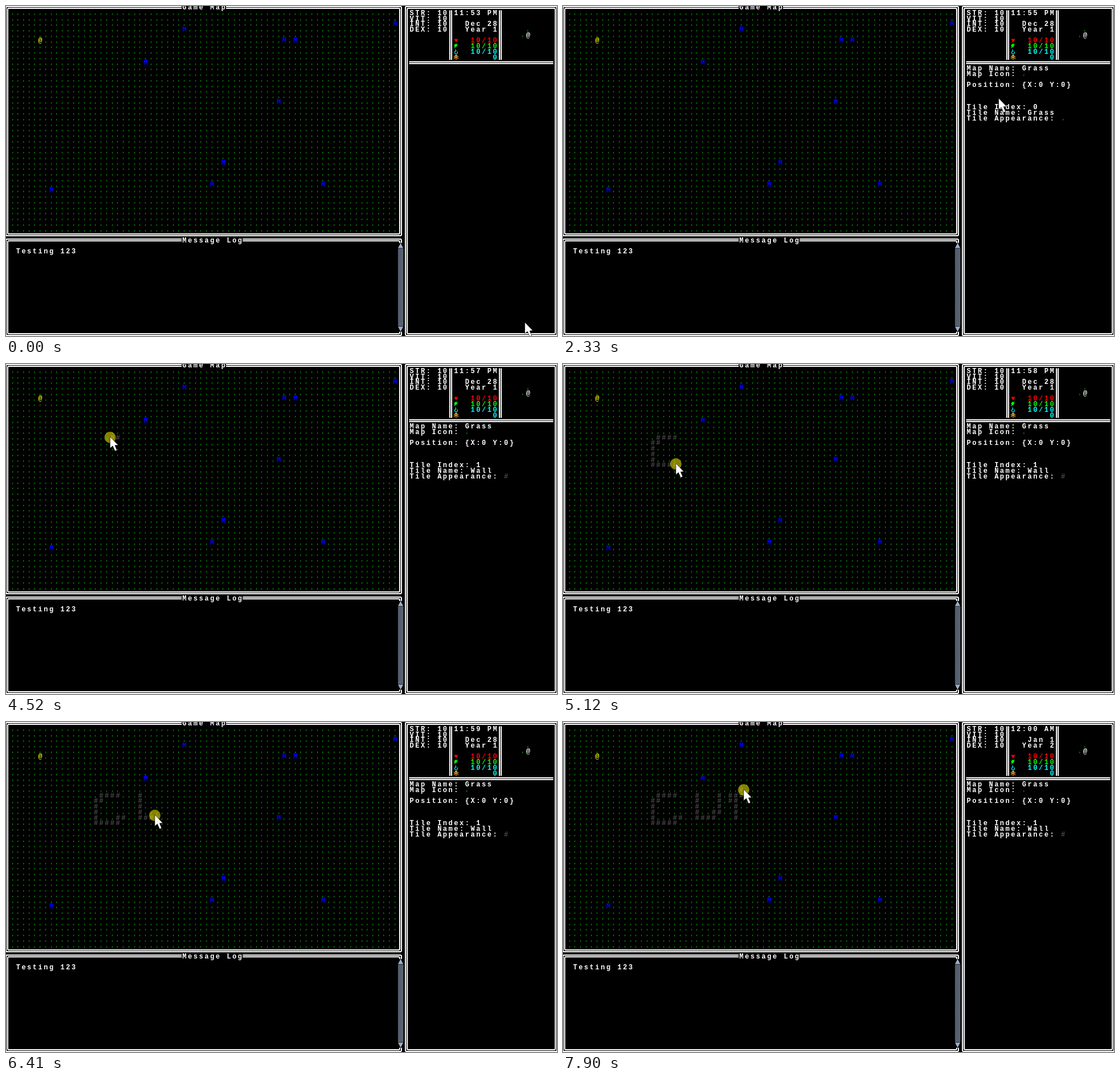
Recreate the animation shown at these times as an HTML page with a canvas. Size 967 px wide and 579 px high, loop 8000 ms.

```html
<!DOCTYPE html>
<html lang="en">
<head>
<meta charset="utf-8">
<title>Map editor</title>
<style>
  html, body { margin: 0; width: 967px; height: 579px; overflow: hidden; background: #000; }
  canvas { display: block; }
</style>
</head>
<body>
<canvas id="stage" width="967" height="579"></canvas>
<script>
const LOOP = 8000, CELL = 9.73, RELEASE_LAG = 200;
const GRASS = '#008000', WALL = '#4c4c4c', STEEL = '#9db1cc';
const stage = document.getElementById('stage');
const backdrop = document.createElement('canvas');
backdrop.width = stage.width;
backdrop.height = stage.height;
let ctx;

// Centre of a character cell
const cx = col => col * CELL + 1.8;
const cy = row => row * CELL + 2.3;
const snap = v => Math.floor(v) + .5;

function use(canvas) {
  ctx = canvas.getContext('2d');
  ctx.font = 'bold 12px "Liberation Mono", "DejaVu Sans Mono", monospace';
  ctx.textAlign = 'center';
}

function print(col, row, text, color = '#fff') {
  ctx.fillStyle = color;
  [...text].forEach((ch, i) => ctx.fillText(ch, cx(col + i), Math.round(cy(row) + 3.8)));
}

function clear(col, row, cols = 1, rows = 1) {
  ctx.fillStyle = '#000';
  ctx.fillRect(cx(col - .5), cy(row - .5), cols * CELL, rows * CELL);
}

function grass(col, row) {
  const x = Math.round(cx(col)), y = Math.round(cy(row));
  ctx.fillStyle = GRASS;
  ctx.fillRect(x - 1, y + 1, 1.5, 2);
  ctx.fillRect(x - 1, y + 3, 1, 1);
}

function outline(x, y, points) {
  ctx.beginPath();
  for (let i = 0; i < points.length; i += 2) ctx.lineTo(x + points[i], y + points[i + 1]);
}

function shape(x, y, points, color) {
  ctx.fillStyle = color;
  outline(x, y, points);
  ctx.closePath();
  ctx.fill();
}

function doubleBox(c0, r0, c1, r1) {
  const left = snap(cx(c0)), top = snap(cy(r0)), right = snap(cx(c1)), bottom = snap(cy(r1));
  ctx.strokeStyle = '#fff';
  ctx.lineWidth = 2;
  for (const d of [-1.5, 1.5]) {
    ctx.beginPath();
    ctx.roundRect(left + d, top + d, right - left - 2 * d, bottom - top - 2 * d, 2);
    ctx.stroke();
  }
}

function doubleLine(c0, r0, c1, r1) {
  ctx.strokeStyle = '#fff';
  ctx.lineWidth = 2;
  const dx = c0 === c1 ? 1.5 : 0, dy = 1.5 - dx;
  for (const side of [-1, 1]) {
    outline(side * dx, side * dy, [snap(cx(c0)), snap(cy(r0)), snap(cx(c1)), snap(cy(r1))]);
    ctx.stroke();
  }
}

function title(row, text) {
  clear(32, row, text.length);
  print(32, row, text);
}

function scrollbar() {
  clear(71, 43, 1, 16);
  const x = cx(70.5), top = cy(42.5), bottom = cy(58.5);
  ctx.save();
  ctx.beginPath();
  ctx.rect(x, top + CELL, CELL, bottom - top - 2 * CELL);
  ctx.clip();
  ctx.strokeStyle = STEEL;
  ctx.lineWidth = 1.2;
  for (let y = top - 10; y < bottom; y += 3) {
    outline(x, y, [0, 0, 10, 10]);
    ctx.stroke();
  }
  ctx.restore();
  shape(x, top, [4.8, 0, 9.4, 9, .2, 9], STEEL);
  shape(x, bottom, [4.8, 0, 9.4, -9, .2, -9], STEEL);
}

function icons() {
  const x = cx(81);
  print(81, 6, '♥', '#f00');
  shape(x, cy(7), [-2, -4, 3, -4, 1, -1, 3, -1, -4, 4, -2, 0, -4, 0], '#0f0');
  ctx.strokeStyle = '#0ff';
  ctx.lineWidth = 1.2;
  ctx.beginPath();
  ctx.arc(x, cy(8) + 1.5, 2.4, -.8, 4.6);
  ctx.lineTo(x - 1, cy(8) - 4);
  ctx.stroke();
  ctx.strokeStyle = '#fa3';
  outline(x, cy(9), [0, -4, 0, 5]);
  for (const y of [-4, -1]) {
    ctx.moveTo(x - 4, cy(9) + y + 4);
    ctx.lineTo(x, cy(9) + y);
    ctx.lineTo(x + 4, cy(9) + y + 4);
  }
  ctx.stroke();
}

function stats() {
  ['STR', 'VIT', 'INT', 'DEX'].forEach((name, i) => print(73, i + 1, name + ': 10'));
  ['#f00', '#0f0', '#0ff'].forEach((color, i) => print(84, 6 + i, '10/10', color));
  print(88, 9, '0', '#0ff');
  icons();
  for (const col of [80, 89]) doubleLine(col, .5, col, 9.5);
  doubleLine(72.5, 10, 98.5, 10);
  print(94, 5, '@');
  grass(93, 5);
  grass(94, 4);
}

function drawBackdrop() {
  const mountains = [[32, 4], [70, 3], [50, 6], [52, 6], [25, 10], [49, 17], [39, 28], [37, 32], [57, 32], [8, 33]];
  use(backdrop);
  ctx.fillRect(0, 0, 967, 579);
  for (let row = 1; row <= 40; row++)
    for (let col = 1; col <= 70; col++) grass(col, row);
  for (const [col, row] of mountains) {
    clear(col, row);
    print(col, row, 'M', '#00f');
  }
  clear(6, 6);
  print(6, 6, '@', '#ff0');
  doubleBox(0, 0, 71, 41);
  doubleBox(0, 42, 71, 59);
  doubleBox(72, 0, 99, 59);
  title(0, 'Game Map');
  title(42, 'Message Log');
  print(2, 44, 'Testing 123');
  scrollbar();
  stats();
}

// Pointer gestures, in cells; each one sets out from the end of the one before
const gestures = [];
let home = [93.4, 56.9];

function gesture(start, end, pen, ...stops) {
  const points = [home, ...stops];
  const lengths = stops.map(([x, y], i) => Math.hypot(x - points[i][0], y - points[i][1]));
  const total = lengths.reduce((a, b) => a + b);
  home = stops.at(-1);
  gestures.push({ start, end, pen, points, lengths, total });
}
const move = (start, end, ...stops) => gesture(start, end, false, ...stops);
const paint = (start, end, ...stops) => gesture(start, end, true, ...stops);

move(60, 640, [44.6, 21.6]);
move(880, 1250, [34.9, 19.1]);
move(1640, 2330, [78.4, 16.5]);
move(2330, 2680, [27.9, 20]);
move(3590, 3890, [18, 13.5]);
move(3890, 4380, [10, 12], [20, 13]);
paint(4450, 5190, [17, 13], [17, 14], [16, 14], [16, 18], [20, 18], [21, 16.7]);
move(5250, 5990, [24, 13]);
paint(6080, 6650, [24, 16.6], [27, 16.6], [28, 16], [28, 13]);
move(6860, 7080, [30, 14]);
paint(7080, 7440, [30, 13], [31, 13], [31, 17]);
paint(7640, 7900, [31, 13], [32.4, 12]);

const progress = (g, t) => Math.min(1, Math.max(0, (t - g.start) / (g.end - g.start)));

function along({ points, lengths, total }, k) {
  let rest = k * total, i = 0;
  while (i < lengths.length - 1 && rest > lengths[i]) rest -= lengths[i++];
  const [x0, y0] = points[i], [x1, y1] = points[i + 1], f = rest / lengths[i];
  return [x0 + (x1 - x0) * f, y0 + (y1 - y0) * f];
}

// Every cell the held pointer has crossed becomes wall
function drawWalls(t) {
  const cells = new Map();
  for (const g of gestures) {
    if (!g.pen || t < g.start) continue;
    for (let k = 0; k <= progress(g, t); k += .007) {
      const cell = along(g, k).map(Math.round);
      cells.set(cell.join(), cell);
    }
  }
  for (const [col, row] of cells.values()) {
    clear(col, row);
    print(col, row, '#', WALL);
  }
}

function drawPointer(t) {
  const g = gestures.findLast(g => t >= g.start) || gestures[0];
  const k = progress(g, t);
  const [col, row] = along(g, g.pen ? k : k * k * (3 - 2 * k));
  const x = cx(col), y = cy(row) - 1;
  if (g.pen && (t < g.end + RELEASE_LAG)) {
    ctx.fillStyle = 'rgba(255, 245, 0, .53)';
    ctx.beginPath();
    ctx.arc(x, y + 1, 10, 0, 7);
    ctx.fill();
  }
  shape(x, y, [0, 0, 0, 20, 4.5, 16, 8.5, 25, 12, 23.5, 8.5, 15, 14, 14.5], '#fff');
  ctx.strokeStyle = '#000';
  ctx.lineWidth = .6;
  ctx.stroke();
}

function drawClock(t) {
  const minute = 53 + Math.floor((t + 100) / 1000), newYear = minute > 59;
  print(81, 1, newYear ? '12:00 AM' : `11:${minute} PM`);
  print(83, 3, newYear ? ' Jan 1' : 'Dec 28');
  print(83, 4, newYear ? 'Year 2' : 'Year 1');
}

function drawTileInfo(t) {
  if (t < 2000) return;
  const index = [2600, 2880, 3350].filter(change => t >= change).length % 2;
  print(73, 11, 'Map Name: Grass');
  print(73, 12, 'Map Icon:');
  grass(83, 12);
  print(73, 14, 'Position: {X:0 Y:0}');
  print(73, 18, 'Tile Index: ' + index);
  print(73, 19, 'Tile Name: ' + ['Grass', 'Wall'][index]);
  print(73, 20, 'Tile Appearance:');
  if (index) print(90, 20, '#', WALL);
  else grass(90, 20);
}

function draw() {
  const t = performance.now() % LOOP;
  ctx.drawImage(backdrop, 0, 0);
  drawWalls(t);
  drawClock(t);
  drawTileInfo(t);
  drawPointer(t);
  requestAnimationFrame(draw);
}

drawBackdrop();
use(stage);
draw();
</script>
</body>
</html>
```
